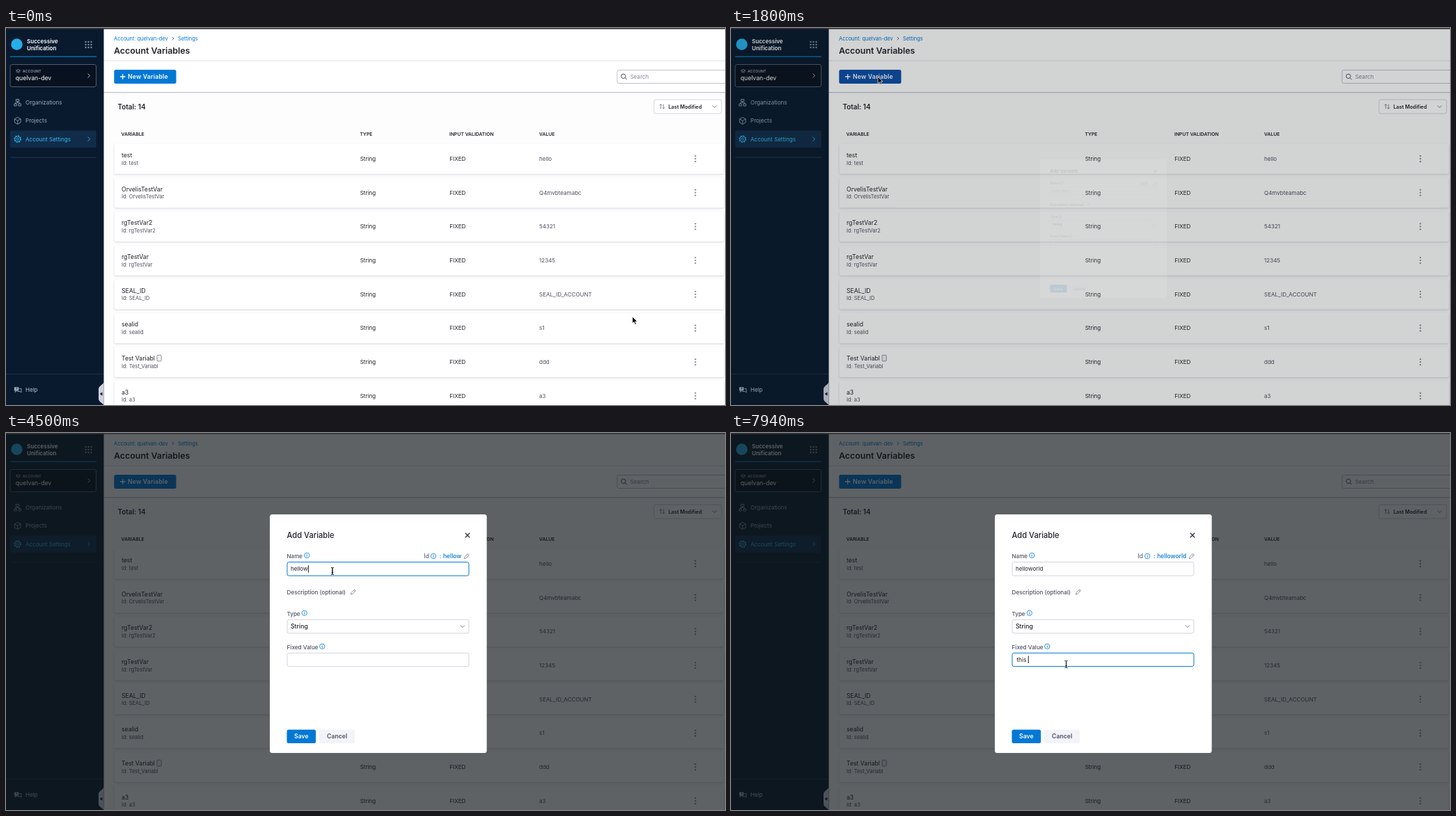
These frames come from a looping animation (1033 px wide and 542 px high, 8 s). An HTML page:

```html
<!DOCTYPE html>
<html lang="en">
<head>
<meta charset="utf-8">
<title>Account variables</title>
<style>
  html, body { margin: 0; width: 100%; height: 100%; overflow: hidden; background: #fff; }
  svg { display: block; width: 100vw; height: 100vh; }
  text { font-family: Inter, "Open Sans", sans-serif; white-space: pre; }
  .card { filter: drop-shadow(0 1px 1.2px rgba(70, 72, 95, .22)); }
</style>
</head>
<body>
<svg id="stage" viewBox="0 0 1033 542" xmlns="http://www.w3.org/2000/svg"></svg>
<script>
const LOOP = 8000, STEP = 150;
const INK = '#22222a', GREY = '#4f5162', BLUE = '#0278d5', EDGE = '#d3d4e0', NAV = '#9aa8ba', CYAN = '#2fb9f2';
const ACCOUNT = 'quelvan-dev';

// cy is the middle of the capitals
const text = (x, cy, size, str, fill = INK, weight = 400, extra = '') =>
  `<text x="${x}" y="${(cy + size * .364).toFixed(2)}" font-size="${size}" font-weight="${weight}" fill="${fill}" ${extra}>${str}</text>`;
const rect = (x, y, w, h, fill, extra = '') =>
  `<rect x="${x}" y="${y}" width="${w}" height="${h}" fill="${fill}" ${extra}/>`;
const line = (d, stroke, width = 1, extra = '') =>
  `<path d="${d}" fill="none" stroke="${stroke}" stroke-width="${width}" ${extra}/>`;
const dot = (x, y, r, fill) => `<circle cx="${x}" cy="${y}" r="${r}" fill="${fill}"/>`;
const box = (x, y, w, h, stroke = EDGE, id = '') =>
  rect(x, y, w, h, '#fff', `rx="2.5" stroke="${stroke}" ${id && `id="${id}"`}`);
const chevron = (x, y, stroke) => line(`M${x - 3} ${y - 1.5}l3 3 3-3`, stroke, .9);
const info = (x, y) =>
  `<g transform="translate(${x} ${y})"><circle r="3.7" fill="none" stroke="${BLUE}" stroke-width=".8"/>` +
  line('M0 -.6V2M0 -2.1V-1.2', BLUE, .9) + '</g>';
const pencil = (x, y) =>
  line(`M${x - 3.4} ${y + 3.4}l.7-2.5 4.6-4.6 1.8 1.8-4.6 4.6zM${x + .7} ${y - 2.5}l1.8 1.8`, '#6b6d85', .75);

function sidebar() {
  let s = rect(0, 0, 140.5, 542, '#091a2f');
  s += dot(15.5, 23.5, 8.2, '#26aee9');
  s += text(30, 18.7, 8.06, 'Successive', '#fff', 600) + text(30, 28.7, 8.06, 'Unification', '#fff', 600);
  for (let i = 0; i < 9; i++) s += dot(114.5 + i % 3 * 4, 20 + Math.floor(i / 3) * 4, 1.15, '#8792a3');
  s += rect(6, 40.6, 124, 1, '#0b93d8');
  s += rect(6, 52.5, 123.5, 32, '#07111f', 'rx="2.5" stroke="#56647a" stroke-width=".9"');
  s += line('M14.5 61l3-1.5 3 1.5-3 1.5zM14.5 62.7l3 1.5 3-1.5', '#9aa5b5', .7);
  s += text(24, 62, 4.96, 'ACCOUNT', '#b3bccb', 500, 'letter-spacing=".25"');
  s += text(13.7, 72.3, 8.68, ACCOUNT, '#fff');
  s += line('M117.5 65.5l3 3-3 3', '#a9b4c4', .9);

  s += line('M14.3 102.5h4.4v3h-4.4zM11.8 109h3.4v3h-3.4zM18 109h3.4v3H18zM16.5 105.5v2M13.5 109v-1.6h6.2v1.6', NAV, .8);
  s += text(28, 107.3, 8.06, 'Organizations', NAV);
  s += line('M16.7 128.4l4.4 2.4v5l-4.4 2.5-4.4-2.5v-5zM12.3 130.8l4.4 2.4 4.4-2.4M16.7 133.2v5', NAV, .8);
  s += text(28, 133.4, 8.06, 'Projects', NAV);

  s += rect(6, 147.5, 123.7, 24.5, '#102c49', 'rx="2"');
  s += `<g transform="translate(16.7 159.7)" fill="none" stroke="${CYAN}"><circle r="3.9" stroke-width=".9"/>` +
    `<circle r="1.6" stroke-width=".9"/><circle r="4.8" stroke-width="1.2" stroke-dasharray="1.9 1.87"/></g>`;
  s += text(28, 159.7, 8.06, 'Account Settings', CYAN);
  s += line('M117.5 156.7l3 3-3 3', CYAN, .9);
  s += rect(6, 185.5, 124, 1, '#203650') + rect(0, 497, 140, 1, '#1d3049');

  s += rect(11.8, 516.2, 6.6, 5.2, NAV, 'rx=".8"') + line('M13.3 521v2.6l2.4-2.4', NAV, .9);
  s += line('M19.4 518.5h2.6v5.5l-1.8-1.5h-4', NAV, .9) + text(14.2, 518.8, 4, '?', '#091a2f', 700);
  s += text(28, 520.3, 8.06, 'Help', '#b5c0ce');
  s += '<path d="M140.5 508c0 5-7.5 6-7.5 11v14c0 4 4 5 7.5 9z" fill="#d0d1df"/>';
  return s + '<path d="M138.5 523.4v5.4l-4-2.7z" fill="#22222a"/>';
}

function page() {
  const rows = [
    ['test', 'test', 'hello'], ['OrvelisTestVar', 'OrvelisTestVar', 'Q4mvbteamabc'],
    ['rgTestVar2', 'rgTestVar2', '54321'], ['rgTestVar', 'rgTestVar', '12345'],
    ['SEAL_ID', 'SEAL_ID', 'SEAL_ID_ACCOUNT'], ['sealid', 'sealid', 's1'],
    ['Test Variabl', 'Test_Variabl', 'ddd'], ['a3', 'a3', 'a3']
  ];
  let s = rect(140, 0, 893, 542, '#fff') + rect(140, 93, 893, 449, '#fdfdfe');
  s += text(155, 15, 7.44, `Account: ${ACCOUNT}`, BLUE) + line('M238.8 12.9l2.2 2.2-2.2 2.2', GREY, .9);
  s += text(247, 15, 7.44, 'Settings', BLUE) + text(155, 32.3, 12.4, 'Account Variables', INK, 600);
  s += rect(140, 46.7, 893, .8, '#d9dae5') + rect(140, 92.3, 893, .9, '#a8a9bf');

  s += rect(155.3, 60, 89.2, 20, BLUE, 'rx="2.5" id="add"');
  s += line('M164 70h7.4M167.7 66.3v7.4', '#fff', 1.3);
  s += text(175, 70, 8.68, 'New Variable', '#fff', 600, 'letter-spacing=".2"');

  s += box(878, 60.5, 162, 19, '#bfc0d0');
  s += `<circle cx="887" cy="69.3" r="3.2" fill="none" stroke="${GREY}"/>` + line('M889.3 71.6l2.6 2.6', GREY);
  s += text(896.7, 70, 8.06, 'Search', '#83859a');

  s += text(160.5, 113, 9.92, 'Total: 14', INK, 600) + box(931, 103, 97, 20);
  s += line('M940.7 116.2v-6.6M938.9 111.4l1.8-1.9 1.8 1.9M944.7 109.5v6.6M942.9 114.3l1.8 1.9 1.8-1.9', '#6b6d85', .8);
  s += text(951.7, 113, 7.3, 'Last Modified', INK, 600) + chevron(1018, 113, '#6b6d85');

  [[165.5, 'VARIABLE'], [508.5, 'TYPE'], [637, 'INPUT VALIDATION'], [766, 'VALUE']]
    .forEach(([x, label]) => s += text(x, 152.2, 6.82, label, INK, 600));

  rows.forEach(([name, id, value], i) => {
    const y = 188 + i * 48.7;
    s += rect(155.5, y - 21.7, 876, 43.4, '#fff', 'rx="2" class="card"');
    s += text(166, y - 5.3, 8.68, name) + text(166, y + 5.8, 7.44, `Id: ${id}`, GREY);
    s += text(508.7, y, 8.06, 'String') + text(637.3, y, 8.06, 'FIXED') + text(766, y, 8.06, value, GREY);
    for (const d of [-4, 0, 4]) s += dot(990.4, y + d, 1.15, '#85879c');
  });
  return s + rect(217, 470.3, 6.2, 8.6, '#f3f3f9', 'rx="1" stroke="#74768d" stroke-width=".8"');
}

function dialog() {
  let s = rect(379, 117, 311.7, 343, '#fff', 'rx="3.5"');
  s += text(403.5, 147.2, 11.16, 'Add Variable', INK, 500);
  s += line('M659.8 143.8l6.4 6.4M666.2 143.8l-6.4 6.4', '#383946', 1.4);
  s += text(403.5, 177, 8.06, 'Name', GREY, 500) + info(432.3, 176);
  s += `<g id="idHead">${text(-23, 177.4, 8.5, 'Id', GREY)}${info(-9.3, 177)}${text(-.5, 177.4, 8.5, ':', GREY, 500, 'id="colon"')}</g>`;
  s += text(654.4, 177.4, 8.5, '', BLUE, 500, 'id="idText" text-anchor="end"') + pencil(661.7, 177.3);
  s += box(404, 185.6, 261, 19.6, EDGE, 'nameBox');
  s += text(409, 195.5, 8.06, 'Enter Name', '#9293ab', 400, 'id="hint"') + text(409, 195.5, 8.06, '', INK, 400, 'id="nameText"');
  s += text(403.5, 229.5, 8.2, 'Description (optional)', GREY, 500) + pencil(498.8, 228.6);
  s += text(403.5, 259.6, 8.06, 'Type', GREY, 500) + info(428.8, 258.8);
  s += box(404, 268.4, 261, 19.4) + text(409, 278.2, 8.68, 'String', INK, 500) + chevron(656, 278, '#6b6d85');
  s += text(403.5, 307.6, 8.2, 'Fixed Value', GREY, 500) + info(454.3, 306.8);
  s += box(404, 316.3, 261, 19.3, EDGE, 'valueBox') + text(410.3, 326, 8.4, '', INK, 400, 'id="valueText"');
  s += rect(403.5, 426.5, 41.7, 19.5, BLUE, 'rx="2.5"') + text(424.3, 436.3, 8.68, 'Save', '#fff', 600, 'text-anchor="middle"');
  s += rect(450, 426.5, 51, 19.5, '#f3f3fa', 'rx="2.5"') + text(475.6, 436.3, 8.68, 'Cancel', GREY, 600, 'text-anchor="middle"');
  return s + rect(0, 0, .9, 10.6, '#000', 'id="caret"');
}

const cursors = {
  arrow: '<path d="M0 0V9.6L2.2 7.6 3.8 11.2 5.5 10.4 3.9 7H7z" fill="#000" stroke="#fff" stroke-width=".7"/>',
  hand: '<path d="M-.9 .8c0-1.3 1.9-1.3 1.9 0V4l4 .8c.8.2 1 .8.9 1.5L5.3 10.5H.2L-2.6 6.6c-.7-1 .5-1.7 1.2-1l.5.6z" fill="#fff" stroke="#000" stroke-width=".8"/>',
  beam: line('M-2 -5.2q2 0 2 1.3V4q0 1.2-2 1.2M2 -5.2q-2 0-2 1.3V4q0 1.2 2 1.2M-1.2 2.2h2.4', '#fff', 1.8, 'opacity=".6"') +
    line('M-2 -5.2q2 0 2 1.3V4q0 1.2-2 1.2M2 -5.2q-2 0-2 1.3V4q0 1.2 2 1.2M-1.2 2.2h2.4', '#000', .9)
};

const stage = document.getElementById('stage');
stage.innerHTML = page() + sidebar() +
  rect(0, 0, 1033, 542, '#10161a', 'id="dim"') +
  rect(0, 0, 1033, 1.6, '#303236') +
  `<g id="dialog">${dialog()}</g>` +
  '<g id="cursor">' + Object.entries(cursors).map(([k, v]) => `<g id="${k}">${v}</g>`).join('') + '</g>';

const el = {};
stage.querySelectorAll('[id]').forEach(n => el[n.id] = n);
const set = (id, attr, value) => el[id].setAttribute(attr, value);
const show = (id, on) => set(id, 'visibility', on ? 'visible' : 'hidden');

// time, x, y
const path = [
  [0, 900, 415], [600, 504, 332], [750, 504, 332], [1650, 211, 70], [1950, 211, 70],
  [2250, 466, 197], [2400, 469, 198.5], [5400, 469, 198.5], [5850, 465.5, 301.5], [6150, 481.5, 332.5]
];

function pointer(t) {
  const i = path.findIndex(k => k[0] > t);
  if (i < 0) return path[path.length - 1].slice(1);
  const [a, b] = [path[i - 1], path[i]];
  const p = (t - a[0]) / (b[0] - a[0]), e = p * p * (3 - 2 * p);
  return [a[1] + (b[1] - a[1]) * e, a[2] + (b[2] - a[2]) * e];
}

const typed = (str, t, start) => str.slice(0, Math.max(0, Math.floor((t - start) / STEP) + 1));

function draw(now) {
  const t = now >= 7940 ? 7950 : Math.floor(now / STEP) * STEP;
  const [x, y] = pointer(t);
  const open = t >= 1800, first = t === 1800;

  set('dim', 'opacity', first ? .19 : open ? .67 : 0);
  show('dialog', open);
  set('dialog', 'opacity', first ? .1 : 1);
  const scale = first ? .583 : t === 1950 ? 1.018 : 1;
  set('dialog', 'transform', `translate(535 288.5) scale(${scale}) translate(-535 -288.5)`);
  set('add', 'fill', t >= 1650 && t < 2100 ? '#0b4ea8' : BLUE);

  const name = t < 4500 ? typed('hello', t, 3450) : 'hello' + typed('world', t, 4500);
  const value = t < 7650 ? '' : t < 7800 ? 't' : t < 7950 ? 'thi' : 'this ';
  el.nameText.textContent = el.idText.textContent = name;
  el.valueText.textContent = value;
  show('hint', open && !name);
  set('idHead', 'transform', `translate(${649.8 - (name ? el.idText.getComputedTextLength() : 0)} 0)`);
  set('colon', 'fill', name ? BLUE : GREY);

  const onValue = t >= 6450, onName = t >= 2250 && !onValue;
  set('nameBox', 'stroke', onName ? BLUE : EDGE);
  set('valueBox', 'stroke', onValue ? BLUE : EDGE);

  const off = [2700, 5550, 6900].some(s => t >= s && t < s + 450);
  const field = onValue ? el.valueText : el.nameText;
  const width = field.textContent ? field.getComputedTextLength() : 0;
  show('caret', (onName || onValue) && !off);
  set('caret', 'x', (onValue ? 410 : 409) + width + (width ? .3 : 0));
  set('caret', 'y', onValue ? 320.4 : 190.1);

  const inField = open && x > 404 && x < 665 && ((y > 185 && y < 206) || (y > 316 && y < 336));
  const kind = inField ? 'beam' : t === 1650 ? 'hand' : 'arrow';
  for (const k in cursors) show(k, k === kind);
  set('cursor', 'transform', `translate(${x} ${y})`);
}

const begin = performance.now();
(function tick() {
  draw((performance.now() - begin) % LOOP);
  requestAnimationFrame(tick);
})();
</script>
</body>
</html>
```
